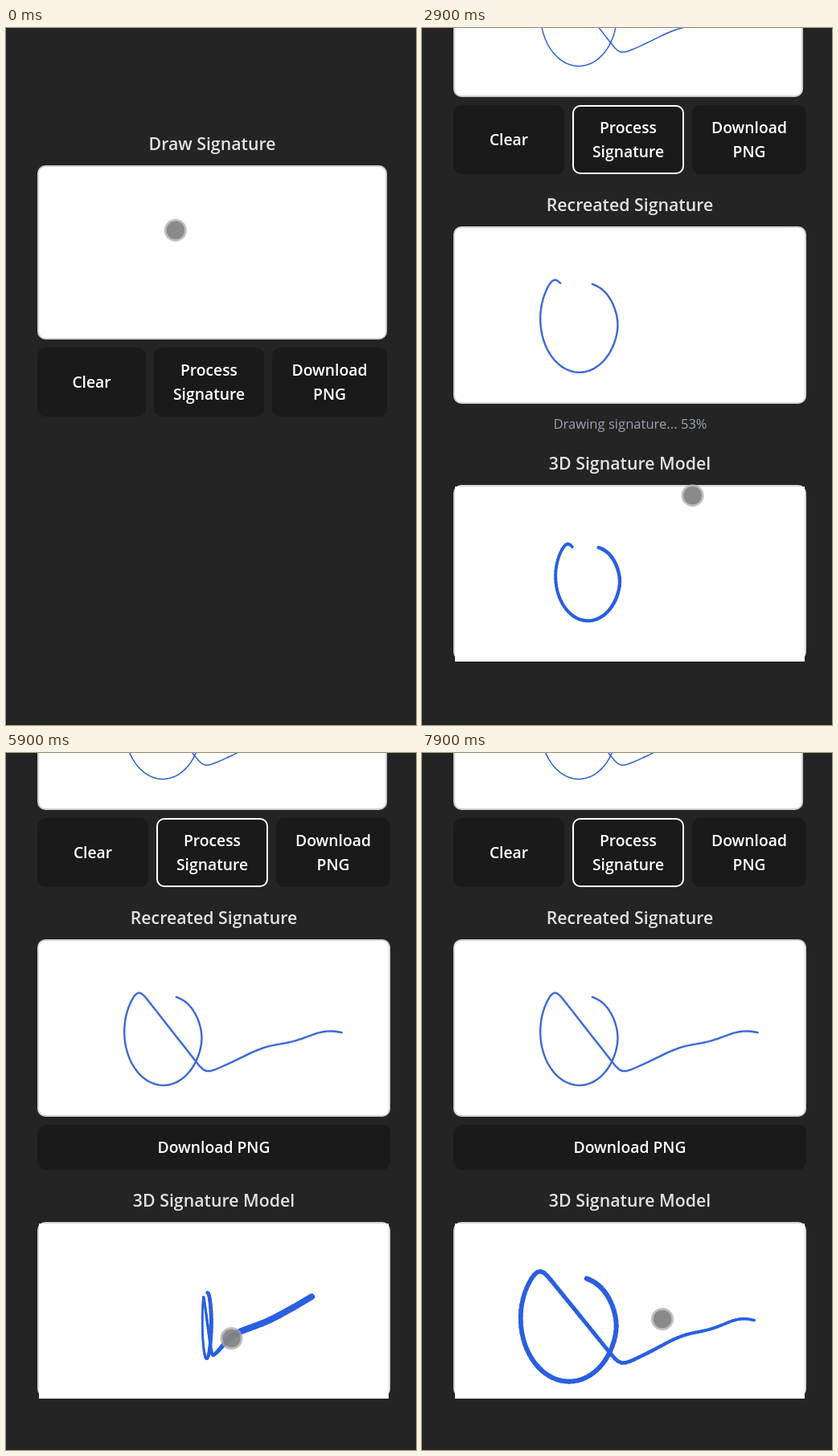
Write an HTML page with a canvas that moves like this. It is 510 by 868 pixels and loops after 8000 ms.

```html
<!DOCTYPE html>
<html>
<head>
<meta charset="utf-8">
<style>
  html, body { margin: 0; width: 100%; height: 100%; overflow: hidden; background: #242424; }
  canvas { display: block; }
</style>
</head>
<body>
<canvas id="stage" width="510" height="868"></canvas>
<script>
const ctx = document.getElementById('stage').getContext('2d');
const LOOP = 8000, STEP = 100;
const PEN_END = 950, PROCESS = 1900, DRAW_START = 2015, DRAW_END = 3700;
const FOCAL = 142;

const ramp = (t, from, to) => Math.max(0, Math.min(1, (t - from) / (to - from)));
const glide = (t, from, to) => (1 - Math.cos(Math.PI * ramp(t, from, to))) / 2;
const mix = (a, b, f) => a + (b - a) * f;

// Pen flourish around the pad centre: a spiral loop, a downstroke and a ripple.
function makeFlourish() {
  let pts = [];
  for (let i = 0; i < 60; i++) {
    const a = (i * 5 - 63) * Math.PI / 180, r = mix(0.72, 1, ramp(i, 0, 14));
    pts.push([-61.5 + 48 * r * Math.cos(a), 4.5 + 66 * r * Math.sin(a)]);
  }
  const [x0, y0] = pts[59];
  for (let v = 0.04; v < 1; v += 0.04) pts.push([mix(x0, -10, v), mix(y0, 56, v)]);
  for (let v = 0; v <= 1; v += 0.03) {
    pts.push([-10 + 168 * v, 56 - 50 * Math.sin(v * Math.PI / 2) + 4 * v * Math.sin(v * 4 * Math.PI)]);
  }
  for (let pass = 0; pass < 4; pass++) {
    pts = pts.map((p, i) => i && i < pts.length - 1
      ? p.map((v, j) => (pts[i - 1][j] + 2 * v + pts[i + 1][j]) / 4) : p);
  }
  return pts;
}
const flourish = makeFlourish();
const upTo = p => flourish.slice(0, Math.max(2, Math.round(p * flourish.length)));
const penProgress = t => ramp(t, -15, PEN_END);

// Stops of the pointer once the pen is lifted: arrival time, x, y.
const stops = [
  [PEN_END, 411, 288], [1100, 441, 266], [1500, 280, 562], [PROCESS, 256, 445], [2100, 265, 455],
  [4100, 444, 773], [4400, 444, 773], [4800, 336, 753], [5300, 336, 753],
  [6500, 225, 705], [7100, 225, 705], [7900, 299, 705]
];

function pointerAt(t) {
  if (t < PEN_END) {
    const [x, y] = upTo(penProgress(t)).pop();
    return [x + 253.5, y + 288.5];
  }
  const next = Math.max(1, stops.findIndex(s => s[0] >= t));
  const [t0, x0, y0] = stops[next - 1], [t1, x1, y1] = stops[next];
  const f = ramp(t, t0, t1);
  return [mix(x0, x1, f), mix(y0, y1, f)];
}

function box(x, y, w, h, fill, border) {
  const inset = border ? 1 : 0;
  ctx.beginPath();
  ctx.roundRect(x + inset, y + inset, w - 2 * inset, h - 2 * inset, 10 - inset);
  ctx.fillStyle = fill;
  ctx.fill();
  if (!border) return;
  ctx.strokeStyle = border;
  ctx.lineWidth = 2;
  ctx.stroke();
}

function label(text, x, y, size, color, weight = 600) {
  ctx.font = `${weight} ${size}px "Open Sans", "Noto Sans", sans-serif`;
  ctx.textAlign = 'center';
  ctx.fillStyle = color;
  ctx.fillText(text, x, y);
}
const heading = (text, x, y) => label(text, x, y, 21.3, '#e2e2e2');

function button(x, y, w, h, lines, border) {
  box(x, y, w, h, '#1a1a1a', border);
  lines.forEach((s, i) =>
    label(s, x + w / 2, y + h / 2 + 7 + 30 * i - 15 * (lines.length - 1), 19.3, '#fff'));
}

function drawInk(p, cx, cy, scale, width, color) {
  ctx.beginPath();
  upTo(p).forEach(([x, y]) => ctx.lineTo(cx + x * scale, cy + y * scale));
  ctx.strokeStyle = color;
  ctx.lineWidth = width;
  ctx.stroke();
}

// Orbiting view: zoom in, swing round to the back, swing home again.
function drawModel(p, t, cx, cy, color) {
  const turn = glide(t, 5300, 6500);
  const angle = 2.69 * turn - 2.8 * glide(t, 7000, 7900);
  const scale = 0.83 + 0.09 * ramp(t, 4900, 5200) + 0.19 * turn;
  const pts = upTo(p).map(([px, py]) => {
    const x = px * 1.02, y = py * 1.02;
    const depth = 1 - x * Math.sin(angle) * scale / FOCAL, k = scale / depth;
    return { x: cx + k * x * Math.cos(angle), y: cy + k * (y + 5 * turn - 0.118 * angle * x), k, depth };
  });
  ctx.strokeStyle = color;
  for (let i = 1; i < pts.length; i++) {
    const a = pts[i - 1], b = pts[i];
    if (Math.min(a.depth, b.depth) < 0.2) continue;
    ctx.beginPath();
    ctx.moveTo(a.x, a.y);
    ctx.lineTo(b.x, b.y);
    ctx.lineWidth = Math.min(8, b.k * mix(5.4, 3.6, i / flourish.length));
    ctx.stroke();
  }
}

function drawPointer(x, y) {
  for (const [r, fill] of [[14, 'rgba(170,170,170,.75)'], [11.3, 'rgba(120,120,120,.75)']]) {
    ctx.beginPath();
    ctx.arc(x, y, r, 0, 2 * Math.PI);
    ctx.fillStyle = fill;
    ctx.fill();
  }
}

function drawResults(t, base) {
  const progress = ramp(t, DRAW_START, DRAW_END);
  const done = progress === 1, modelTop = base + (done ? 513 : 483);

  heading('Recreated Signature', 258.5, base + 142);
  box(39, base + 161, 439, 221, '#fff', '#d1d5db');
  if (progress) drawInk(progress, 258.5, base + 271.5, 1.02, 2.4, '#3b68d8');

  if (done) button(39, base + 392, 439, 56, ['Download PNG']);
  else label(`Drawing signature... ${Math.round(progress * 100)}%`, 259, base + 413, 16.6, '#9ca3af', 400);

  heading('3D Signature Model', 258.5, modelTop - 19);
  box(39, modelTop, 439, 218, '#fff', '#d1d5db');
  ctx.save();
  ctx.beginPath();
  ctx.rect(41, modelTop + 2, 435, 218);
  ctx.clip();
  ctx.fillStyle = '#fff';
  ctx.fill();
  if (progress) drawModel(progress, t, 258.5, modelTop + 110, progress < 0.08 ? '#b8bcc4' : '#2a5fe0');
  ctx.restore();
}

function draw(t) {
  const processed = t >= PROCESS;
  const base = t >= DRAW_END ? 71 : mix(388, 86, glide(t, PROCESS, PROCESS + 200));

  ctx.fillStyle = '#242424';
  ctx.fillRect(0, 0, 510, 868);
  ctx.lineCap = ctx.lineJoin = 'round';

  heading('Draw Signature', processed ? 258.5 : 256.5, base - 236);
  box(39, base - 217, 435, 217, '#fff', '#d3cdd8');
  drawInk(penProgress(t), 256.5, base - 108.5, 1, 1.5, '#2b60d4');

  const top = base + 10;
  const [w1, w2, w3] = processed ? [138, 139, 142] : [135, 137, 143];
  button(39, top, w1, 86, ['Clear']);
  button(49 + w1, top, w2, 86, ['Process', 'Signature'], processed && '#fff');
  button(59 + w1 + w2, top, w3, 86, ['Download', 'PNG']);

  if (processed) drawResults(t, base);
  drawPointer(...pointerAt(t));
}

function tick(now) {
  draw(Math.floor(now % LOOP / STEP) * STEP);
  requestAnimationFrame(tick);
}
requestAnimationFrame(tick);
</script>
</body>
</html>
```
